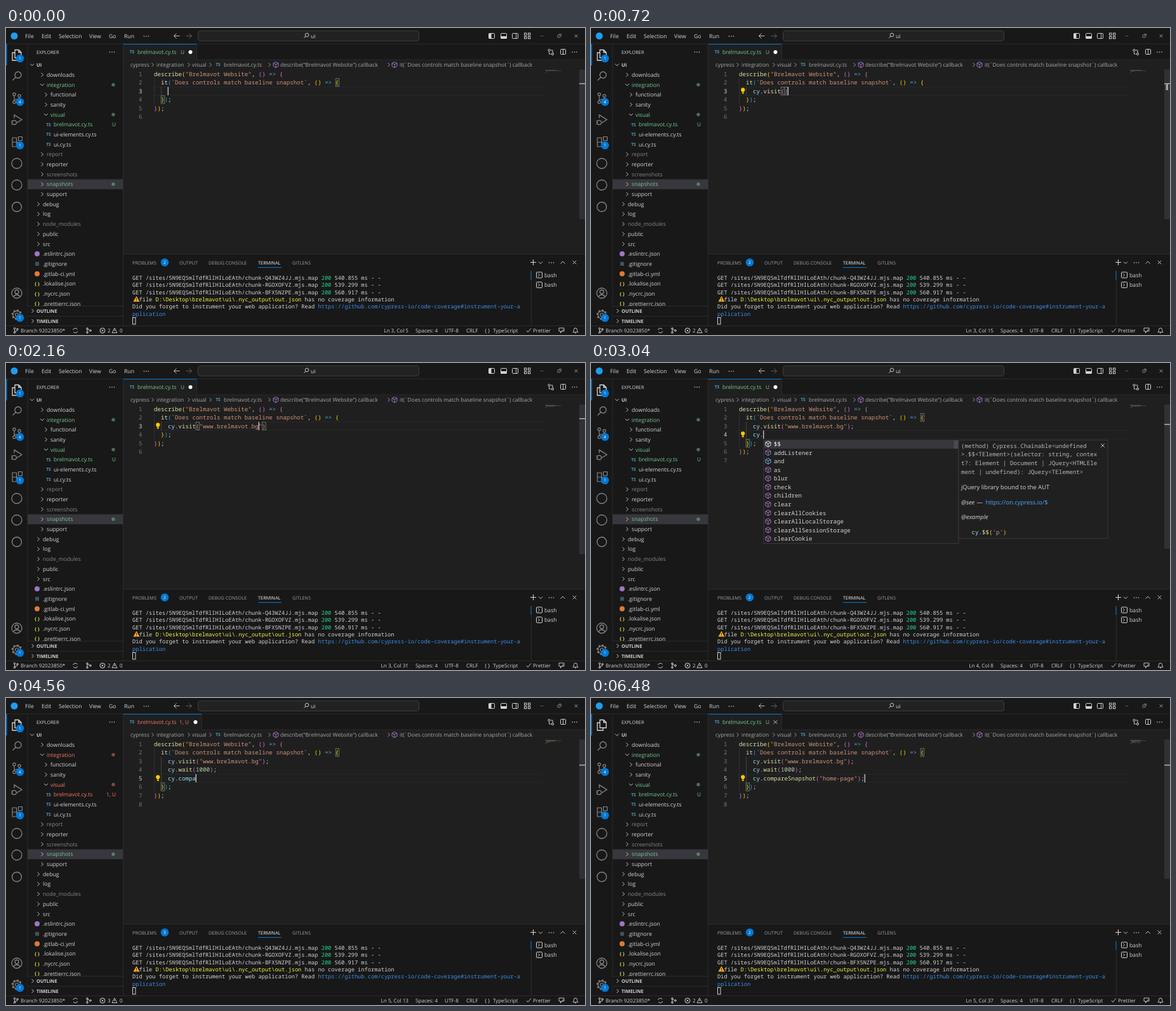
Recreate the animation shown at these times as an HTML page. Size 912x484 px, loop 6560 ms.

```html
<!DOCTYPE html>
<html lang="en">
<head>
<meta charset="utf-8">
<title>Code editor</title>
<style>
  html, body { margin: 0; width: 100%; height: 100%; overflow: hidden; background: #181818; }
  svg { display: block; }
  text { white-space: pre; font-family: "Open Sans", "Noto Sans", sans-serif; text-rendering: geometricPrecision; }
  .mono { font-family: "Noto Sans Mono", "DejaVu Sans Mono", monospace; font-weight: 500; }
</style>
</head>
<body>
<svg id="stage" width="912" height="484" viewBox="0 0 912 484"></svg>
<script>
const LOOP = 6560, STEP = 80;
const FG = '#d4d4d4', DIM = '#868686', GREEN = '#73c991', RED = '#f4775f', BLUE = '#0078d4', TS = '#519aba';
const FILE = 'brelmavot.cy.ts';
const CODE_X = 233, CODE_SIZE = 9.167, CHAR = 5.5, LINE = 13.57;
const lineY = n => 72.3 + LINE * (n - 1);

// ---- drawing helpers, y is the visual middle of a text ----
const esc = s => String(s).replace(/&/g, '&amp;').replace(/</g, '&lt;');
const span = (s, fill) => `<tspan fill="${fill}">${esc(s)}</tspan>`;
const rawText = (x, y, inner, fill = FG, size = 8.7, attrs = '') =>
  `<text x="${x}" y="${y + size * .36}" font-size="${size}" fill="${fill}" ${attrs}>${inner}</text>`;
const text = (x, y, s, ...rest) => rawText(x, y, esc(s), ...rest);
const mono = (x, y, inner, fill = FG, size = CODE_SIZE) => rawText(x, y, inner, fill, size, 'class="mono"');
const rect = (x, y, w, h, fill, attrs = '') => `<rect x="${x}" y="${y}" width="${w}" height="${h}" fill="${fill}" ${attrs}/>`;
const box = (x, y, w, h, stroke, rx = 0) => rect(x, y, w, h, 'none', `stroke="${stroke}" rx="${rx}"`);
const dot = (x, y, r, fill, attrs = '') => `<circle cx="${x}" cy="${y}" r="${r}" fill="${fill}" ${attrs}/>`;
const ring = (x, y, r, color = FG, w = 1) => dot(x, y, r, 'none', `stroke="${color}" stroke-width="${w}"`);
const path = (d, color = FG, w = .9) => `<path d="${d}" fill="none" stroke="${color}" stroke-width="${w}"/>`;
const chevron = (x, y, open, color = FG) =>
  path(open ? `M${x - 3} ${y - 1.5}l3 3 3-3` : `M${x - 1.5} ${y - 3}l3 3-3 3`, color);
const cross = (x, y, r = 2.8, color = FG) => path(`M${x - r} ${y - r}l${2 * r} ${2 * r}m0 ${-2 * r}l${-2 * r} ${2 * r}`, color);
const dots = (x, y) => [-3.5, 0, 3.5].map(d => dot(x + d, y, .8, FG)).join('');
const cube = (x, y, color = '#b180d7') =>
  path(`M${x} ${y - 4.5}l4 2v4.6l-4 2.4-4-2.4v-4.6zm-4 2l4 2 4-2m-4 2v5`, color, .85);
const badge = (x, y, s) => dot(x, y, 6.3, BLUE) + text(x, y, s, '#fff', 6.6, 'text-anchor="middle"');
const tsIcon = (x, y) => text(x, y, 'TS', TS, 6.8, 'font-weight="700" text-anchor="middle"');
const lens = (x, y, r, color = FG, w = .9) =>
  ring(x, y, r, color, w) + path(`M${x - r * .7} ${y + r * .7}l${-r} ${r}`, color, w);

// ---- static parts ----
function titleBar() {
  const menu = [[30, 'File'], [56, 'Edit'], [83, 'Selection'], [131, 'View'], [162, 'Go'], [186, 'Run']];
  return rect(0, 24.5, 912, 1, '#2b2b2b') + dot(13, 12.5, 5.5, '#1f9cf0') +
    menu.map(([x, s]) => text(x, 12.5, s)).join('') + dots(221, 13) +
    path('M273.500 12.500h-9m4-4l-4 4 4 4') + path('M283.500 12.500h9m-4-4l4 4-4 4', '#666') +
    rect(302.5, 4.5, 348, 16, '#222', 'rx="3.5" stroke="#3c3c3c"') + lens(474, 11, 2.8) + text(480, 12.5, 'ui') +
    [760.5, 779.5, 797.5].map(x => box(x, 8.5, 9, 8, FG, 1)).join('') +
    rect(760.5, 8.5, 4, 8, FG) + rect(779.5, 13, 9, 4, FG) + path('M803.500 8.500v8') +
    [[816.5, 8], [822.5, 8], [816.5, 13.5], [822.5, 13.5]].map(([x, y]) => box(x, y, 3.3, 3.3, FG)).join('') +
    path('M841.500 12.500h5', '#888', .6) + path('M869 11h3.800v3.800h-3.800zM871 9.500h3.500v3.500', '#aaa', .7) + cross(898, 12.5, 2.3, '#aaa');
}

function activityBar() {
  return rect(33.5, 25, 1, 444, '#2b2b2b') + rect(0, 25, 1.5, 34, BLUE) +
    path('M14 34.500h6l4 4v8.500h-10zM20 34.500v4h4M14 39h-4v12h9v-4', '#d7d7d7', 1.3) +
    lens(19, 74, 5, DIM, 1.3) +
    ring(13, 104.5, 2.2, DIM, 1.2) + ring(13, 117, 2.2, DIM, 1.2) + ring(21, 107, 2.2, DIM, 1.2) +
    path('M13 107v8M21 109q0 4-8 4', DIM, 1.2) +
    path('M13 142v-5l12 7.500-8 5', DIM, 1.3) + ring(13, 149, 3.3, DIM, 1.2) + path('M8 146l2 1M8 149h2M8 152l2-1', DIM) +
    path('M10 173h6.500v14h-6.500zM10 180h14v7h-14zM19.500 171.500h6v6h-6z', DIM, 1.2) +
    ring(17, 213.5, 8, DIM, 1.3) + ring(17, 247.5, 8, DIM, 1.3) + ring(17, 282, 7.5, DIM, 1.3) +
    ring(17, 418, 8, DIM, 1.3) + ring(17, 416, 3, DIM, 1.3) + path('M11.500 423.500q5.500-6 11 0', DIM, 1.3) +
    ring(17, 452, 2.5, DIM, 1.2) + ring(17, 452, 6, DIM, 1.3) +
    dot(17, 452, 7.3, 'none', `stroke="${DIM}" stroke-width="2" stroke-dasharray="2.500 3.230"`) +
    badge(22, 116.5, 4) + badge(22, 185, 1) + badge(22, 457, 1);
}

function panel() {
  const size = 8.717, cell = 5.23, ty = i => 393.7 + 11.35 * i;
  const row = (i, inner) => mono(199, ty(i), inner, FG, size);
  const gets = [['Q43WZ4JJ', '540.855'], ['RGOXOFVZ', '539.299'], ['BFX5NZPE', '560.917']];
  const tabs = [[199, 'PROBLEMS'], [273, 'OUTPUT'], [319, 'DEBUG CONSOLE'], [397, 'TERMINAL'], [451, 'GITLENS']];
  return rect(185, 356, 727, 113, '#181818') + rect(185, 356, 727, 1, '#2b2b2b') +
    tabs.map(([x, s]) => text(x, 370, s, s === 'TERMINAL' ? '#f0f0f0' : '#9d9d9d', 7.35)).join('') +
    rect(397, 377, 37, 1, BLUE) +
    path('M826 369.500h9m-4.500-4.500v9', FG, 1.1) + chevron(842, 370, true) + dots(859, 370) +
    path('M873.500 371.500l3.500-3.500 3.500 3.500') + cross(895.5, 369.5) +
    gets.map(([id, ms], i) => row(i,
      `GET /sites/5N9EQSmlTdfRlIHILoEAth/chunk-${id}.mjs.map ${span('200', '#23d18b')} ${ms} ms - -`)).join('') +
    `<path d="M205.500 422.500l5 9h-10z" fill="#f5a623"/><path d="M205.500 425.500v3m0 1v1" stroke="#222"/>` +
    mono(199 + 2 * cell, ty(3), 'file ' + span('D:\\Desktop\\brelmavot\\ui\\.nyc_output\\out.json', '#f5f543') +
      ' has no coverage information', FG, size) +
    row(4, 'Did you forget to instrument your web application? Read ' +
      span('https://github.com/cypress-io/code-coverage#instrument-your-a', '#3b8eea')) +
    row(5, span('pplication', '#3b8eea')) + box(199.5, 456.5, 4.5, 10.5, FG) +
    rect(827, 383, 1, 86, '#2b2b2b') + rect(826.5, 383, 1, 14, BLUE) +
    [389.4, 405].map(y => box(835.5, y - 4.5, 9, 9, FG, 1) + path(`M838 ${y - 2.5}l2.500 2.500-2.500 2.500`) +
      text(848, y, 'bash')).join('');
}

function statusBar() {
  const items = [[23, 'Branch 92023850*'], [645, 'Spaces: 4'], [691, 'UTF-8'], [725, 'CRLF'], [754, '{ }'],
    [767, 'TypeScript'], [830, 'Prettier'], [179, '0']];
  return rect(0, 469, 912, 15, '#181818') + rect(0, 469, 912, 1, '#2b2b2b') +
    items.map(([x, s]) => text(x, 477, s, FG, 8.1)).join('') +
    ring(13.5, 473.8, 1.3) + ring(13.5, 480, 1.3) + ring(18, 475, 1.3) + path('M13.500 475v4M18 476.500q0 2-4.500 2') +
    path('M105.500 476a4 4 0 0 1 7-1m.500 3a4 4 0 0 1-7 1') +
    ring(128, 474, 1.3) + ring(128, 480, 1.3) + ring(133, 477, 1.3) + path('M128 475v4M129 475l3 2') +
    ring(152, 477, 4) + cross(152, 477, 1.6) + path('M171 473l4 7.500h-8zM171 475.500v2.500') +
    path('M820 477l2 2.500 5-6') + path('M871 473h8v5h-3l-2.500 2.500v-2.500h-2.500zM873 481l5-6') +
    path('M893 479.500q1.500-1.500 1.500-4a2.500 2.500 0 0 1 5 0q0 2.500 1.500 4zM896 481h2');
}

function editorFrame() {
  const crumbs = [[196, 'cypress'], [237, 'integration'], [293, 'visual'], [343, FILE],
    [432, 'describe("Brelmavot Website") callback'], [620, 'it(`Does controls match baseline snapshot`) callback']];
  return rect(185, 50, 727, 306, '#1f1f1f') + rect(184, 25, 1, 444, '#2b2b2b') + rect(185, 49.5, 727, 1, '#2b2b2b') +
    ring(855.5, 35, 1.6) + ring(861, 41, 1.6) + path('M855.500 37v4h3M861 39v-4h-3') +
    box(873.5, 33.5, 8, 8, FG, 1) + path('M877.500 33.500v8') + dots(895.5, 38) +
    crumbs.map(([x, s]) => text(x, 58, s, '#a9a9a9', 8.5)).join('') +
    [231, 288, 322, 415, 603].map(x => chevron(x, 58, false, '#a9a9a9')).join('') +
    tsIcon(334, 58) + cube(425, 58) + cube(612, 58);
}

// ---- sidebar ----
// marks: v open folder, > closed folder, t ts file, o * # j other file icons; digit is the indent
const tree = `v0UI|>2downloads|v2integration|>3functional|>3sanity|v3visual|t4${FILE}|t4ui-elements.cy.ts|t4ui.cy.ts|>2report|>2reporter|>2screenshots|>2snapshots|>2support|>1debug|>1log|>1node_modules|>1public|>1src|o1.eslintrc.json|*1.gitignore|#1.gitlab-ci.yml|j1.lokalise.json|j1.nycrc.json|j1.prettierrc.json`
  .split('|').map(s => ({ mark: s[0], indent: +s[1], name: s.slice(2) }));
const ignored = ['report', 'screenshots', 'node_modules'];
const changed = ['integration', 'visual', FILE];

function sidebar(red) {
  const tint = red ? RED : GREEN;
  const rows = tree.map(({ mark, indent, name }, i) => {
    const y = 58 + 15.69 * i, x = indent ? [0, 58, 64, 70, 75][indent] : 48;
    const color = changed.includes(name) ? tint : name === 'snapshots' ? GREEN : ignored.includes(name) ? DIM : FG;
    let out = name === 'snapshots' ? rect(34, y - 7.8, 150, 15.7, '#37373d') : '';
    out += indent ? text(x, y, name, color) : text(x, y, name, color, 7.5, 'font-weight="700"');
    if ('v>'.includes(mark)) out += chevron(x - 7, y, mark === 'v');
    if (mark === 't') out += tsIcon(67, y);
    if (mark === 'o') out += dot(49, y, 4, '#a074c4');
    if (mark === '*') out += rect(46, y - 3, 6, 6, '#41535b');
    if (mark === '#') out += dot(49, y, 4, '#e37933');
    if (mark === 'j') out += text(49, y, '{ }', '#cbcb41', 7.5, 'font-weight="700" text-anchor="middle"');
    if (name === FILE) out += text(173, y, red ? '1, U' : 'U', tint, 8.3, 'text-anchor="end"');
    else if (color === GREEN || color === RED) out += dot(169, y, 2.7, color, 'opacity=".5"');
    return out;
  }).join('');
  const sections = [['OUTLINE', 446], ['TIMELINE', 462]].map(([s, y]) => rect(34, y - 8, 150, 1, '#2b2b2b') +
    chevron(42, y, false) + text(48, y, s, FG, 7.4, 'font-weight="700"')).join('');
  return text(48, 38, 'EXPLORER', FG, 7.4) + dots(167, 38) + rows + rect(34, 438, 150, 31, '#181818') + sections;
}

// ---- typing: "<" moves the caret left, brackets and quotes close themselves ----
const typing = [
  [0, 680, 'cy.visit()'],
  [720, 2120, '<"www.brelmavot.bg'],
  [2160, 2960, '");\ncy.'],
  [3040, 3880, 'wait(1000'],
  [3920, 5240, ');\ncy.compareSnapshot("'],
  [5280, 6200, 'home-page");'],
];

function typedAt(t) {
  const done = [];
  let before = '    ', after = '';
  for (const [start, end, keys] of typing) {
    const p = Math.min(1, Math.max(0, (t - start) / (end - start)));
    for (const key of keys.slice(0, Math.floor(p * keys.length))) {
      if (key === '<') { after = before.slice(-1) + after; before = before.slice(0, -1); }
      else if (key === '\n') { done.push(before + after); before = '    '; after = ''; }
      else {
        if (after[0] === key) after = after.slice(1);
        else if (key === '(') after = ')' + after;
        else if (key === '"') after = '"' + after;
        before += key;
      }
    }
  }
  return { done, before, after };
}

const BRACKETS = ['#ffd700', '#da70d6', '#179fff'];
function highlight(lines) {
  let depth = 0;
  const token = /("[^"]*"?|`[^`]*`)|(\w+(?=\())|(=>)|(\d+)|([({])|([)}])|(\w+)|[^\w]/g;
  return lines.map(line => line.replace(token, (s, str, fn, arrow, num, open, close, word) =>
    span(s, str ? '#ce9178' : fn ? '#dcdcaa' : arrow ? '#569cd6' : num ? '#b5cea8' : word ? '#9cdcfe' :
      open ? BRACKETS[depth++ % 3] : close ? BRACKETS[--depth % 3] : FG)));
}

function matchBrackets(before, after, row, lines) {
  const open = before.lastIndexOf('(');
  if (before.endsWith(')')) return [[row, open], [row, before.length - 1]];
  if (open >= 0 && after.includes(')')) return [[row, open], [row, before.length + after.indexOf(')')]];
  return [[2, lines[1].length - 1], [row + 1, 2]];
}

function suggestions(x, y) {
  const names = ['$$', 'addListener', 'and', 'as', 'blur', 'check', 'children', 'clear', 'clearAllCookies',
    'clearAllLocalStorage', 'clearAllSessionStorage', 'clearCookie'];
  const signature = ['(method) Cypress.Chainable<undefined', '>.$$<TElement>(selector: string, contex',
    't?: Element | Document | JQuery<HTMLEle', 'ment | undefined): JQuery<TElement>'];
  const italic = 'font-style="italic"', border = 'stroke="#383838"';
  return `<g transform="translate(${x} ${y})">` +
    rect(.5, .5, 307, 163, '#202020', border) + rect(1, 1, 306, 13, '#37373d') + rect(300, 1, 7, 13, '#4b4b4f') +
    names.map((s, i) => cube(7.5, 6.7 + LINE * i, i === 0 ? '#fff' : s === 'and' ? '#75beff' : undefined) +
      mono(16.5, 6.7 + LINE * i, esc(s), i ? FG : '#fff')).join('') +
    rect(307.5, .5, 235, 155, '#202020', border) +
    signature.map((s, i) => mono(311.5, 9.5 + LINE * i, esc(s), '#b8b8b8')).join('') + cross(534.5, 9) +
    text(311.5, 75, 'jQuery library bound to the AUT', FG, 9.4) +
    text(311.5, 98.5, '@see', FG, 9.4, italic) + text(336, 98.5, '—', FG, 9.4) +
    text(350, 98.5, 'https://on.cypress.io/$', '#4daafc', 9.4) + text(311.5, 122, '@example', FG, 9.4, italic) +
    mono(328, 145.5, span('cy', '#9cdcfe') + '.' + span('$$', '#dcdcaa') + span('(', '#ffd700') +
      span("'p'", '#ce9178') + span(')', '#ffd700')) + '</g>';
}

function scrollSlider(lineCount) {
  const view = 291, content = view + (lineCount - 1) * LINE;
  return rect(903, 65.5, 9, view * view / content, '#313135');
}

function editor(t, red) {
  const { done, before, after } = typedAt(t);
  const row = 3 + done.length, y = lineY(row), caretX = CODE_X + CHAR * before.length;
  const lines = ['describe("Brelmavot Website", () => {', '  it(`Does controls match baseline snapshot`, () => {',
    ...done, before + after, '  });', '});', ''];
  const guide = (x, from, to, color) => rect(x, lineY(from) - 6.8, .8, LINE * (to - from + 1), color);
  const squiggle = red && before.includes('compareSnapshot(');
  const rulerY = 87 + 9 * (row - 3);
  let out = scrollSlider(lines.length) + rect(CODE_X, y - 6.8, 612, .8, '#2a2a2a') + rect(CODE_X, y + 6, 612, .8, '#2a2a2a') +
    guide(CODE_X, 2, row + 1, '#363636') + guide(CODE_X + 2 * CHAR, 3, row, '#4a4a4a');
  for (const [r, c] of matchBrackets(before, after, row, lines))
    out += rect(CODE_X + CHAR * c + .2, lineY(r) - 6.2, CHAR, 12.4, '#1c2a1c', 'stroke="#7c7c7c" stroke-width=".8"');
  highlight(lines).forEach((code, i) => {
    const n = i + 1, indent = lines[i].search(/\S|$/);
    out += rawText(214.5, lineY(n), n, n === row ? FG : '#6e7681', CODE_SIZE, 'class="mono" text-anchor="end"') +
      mono(CODE_X, lineY(n), code) +
      rect(849 + indent * .475, 66 + i * .95, (lines[i].length - indent) * .475, .6,
        squiggle && n === row ? RED : '#b79a80', 'opacity=".5"');
  });
  if (squiggle) out += path(`M271.500 ${y + 5.5}` + 'l1.375-1.500 1.375 1.500'.repeat(30), '#f14c4c', .8);
  if (before.trim())
    out += dot(239.3, y - 2, 3.1, '#ffcc00') + rect(237.8, y + .5, 3, 3.6, '#ffcc00') + path(`M237.800 ${y + 2}h3`, '#1f1f1f', .6);
  out += rect(caretX - .3, y - 6.5, 1.2, 13, '#dcdcdc') + rect(903, rulerY, 9, 1.5, '#b0b0b0');
  if (/[()]$/.test(before) || after[0] === ')') out += rect(905.5, rulerY, 3.5, 11, '#a0a0a0');
  if (squiggle) out += rect(909, rulerY + 1, 3, 10, '#d9553f');
  if (before.endsWith('cy.')) out += suggestions(caretX, y + 8);
  return out + text(634, 477, `Ln ${row}, Col ${before.length + 1}`, FG, 8.1, 'text-anchor="end"');
}

function live(t) {
  const saved = t >= 6320, red = t >= 3360 && !saved, problems = t >= 4400 && !saved ? 3 : 2;
  const tint = red ? RED : GREEN, tabEnd = red ? 308 : 300;
  return sidebar(red) + (saved ? '' : badge(22, 48, 1)) +
    rect(185, 25, tabEnd - 185, 25.5, '#1f1f1f') + rect(185, 25, tabEnd - 185, 1, BLUE) + rect(tabEnd, 25, 1, 25, '#2b2b2b') +
    tsIcon(198.5, 38) + text(207, 38, FILE, tint) + text(tabEnd - (red ? 20 : 19), 38, red ? '1, U' : 'U', tint, 8.3, 'text-anchor="end"') +
    (saved ? cross(290.5, 38) : dot(tabEnd - 9.5, 38, 3, '#fff')) +
    badge(250, 369.5, problems) + text(160, 477, problems, FG, 8.1) + editor(t, red);
}

const stage = document.getElementById('stage');
stage.innerHTML = rect(0, 0, 912, 484, '#181818') + titleBar() + activityBar() + editorFrame() + panel() + statusBar() + '<g id="live"></g>';
const layer = document.getElementById('live');
let shown = -1;
function tick() {
  const t = Math.floor(performance.now() % LOOP / STEP) * STEP;
  if (t !== shown) layer.innerHTML = live(shown = t);
  requestAnimationFrame(tick);
}
tick();
</script>
</body>
</html>
```
